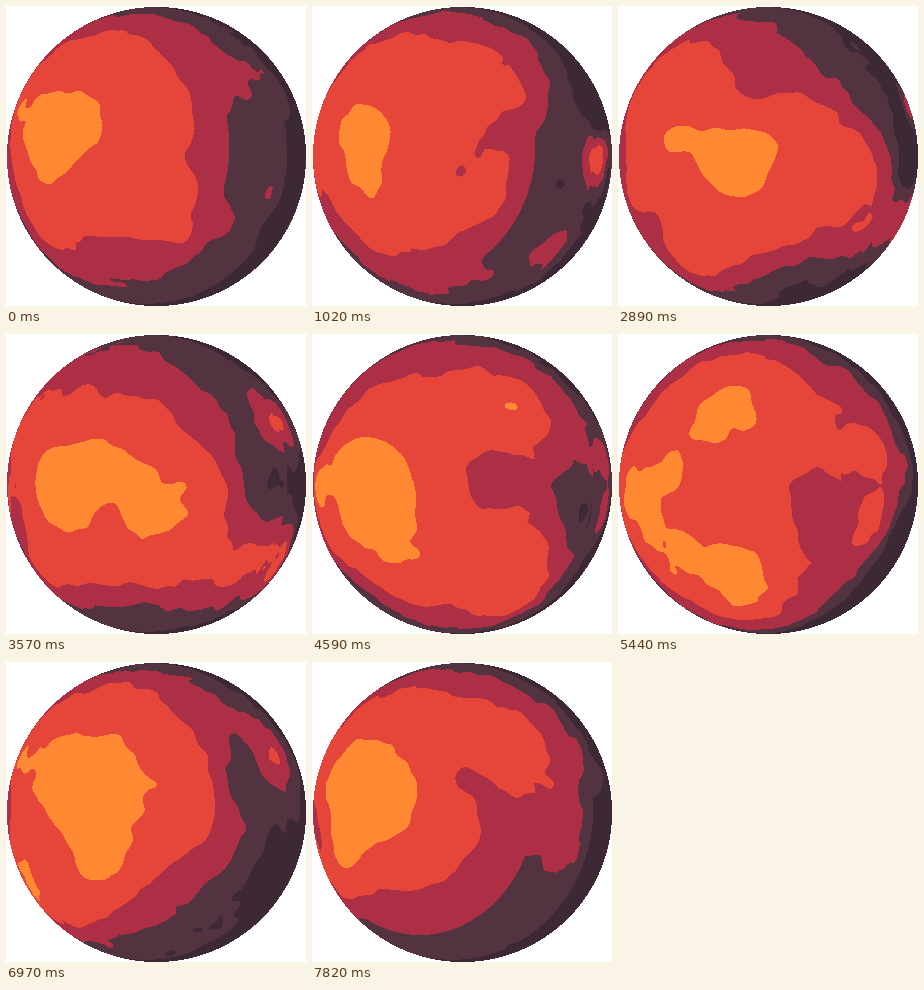
An HTML page with a canvas that plays this animation: 300x300 px, repeating every 7990 ms.

```html
<!DOCTYPE html>
<html lang="en">
<head>
<meta charset="utf-8">
<title>Rotating planet</title>
<style>
  html, body { margin: 0; width: 100%; height: 100%; overflow: hidden; background: #fff; }
  canvas { display: block; }
</style>
</head>
<body>
<canvas id="planet" width="300" height="300"></canvas>
<script>
const SIDE = 300;
const TURN = 60;          // steps in a full turn
const STEPS = 47;         // steps in the loop
const STEP_MS = 170;
const COLORS = ['ff8933', 'e64539', 'ad2f45', '52333f', '3d2936'];

// The globe is 400 units around; the visible side spans -100..100 both ways
const AROUND = 400, POLE = 100;
const LIGHT = { lon: -36, lat: -5 };
const MEAN = 0.44;
const REACH = 12;

// Key places (lon, lat) by terrain height; low ground is bright
const PLACES = [
  { height: 0.12, at: [[102, 0], [203, 50]] },
  { height: 0.21, at: [[140, -3], [137, 14], [174, 30], [195, -25], [203, 23], [206, -32],
    [249, -15], [251, 20], [325, -22]] },
  { height: 0.35, at: [[383, -14], [356, -24], [352, 14], [5, 19], [62, -24], [123, 9], [100, 19],
    [119, -15], [79, 37], [290, -10], [226, -19], [164, 0], [125, 27], [49, 13], [345, -4]] },
  { height: 0.48, at: [[12, -15], [20, 39], [70, -18], [222, 0], [235, 14], [266, 28],
    [156, -19], [328, 2], [174, -30], [305, 12], [368, 4]] },
  { height: 0.6, at: [[38, 5], [76, 0], [80, 17], [60, 25], [107, -20], [127, -34], [183, 0],
    [122, 55], [267, 52], [313, 20], [318, 32], [282, 31], [380, 33], [303, -13], [95, -28]] }
];

const clamp = v => Math.min(1, Math.max(0, v));
const ease = t => t * t * (3 - 2 * t);
const mix = (a, b, t) => a + (b - a) * t;
const wrap = (v, n) => ((v % n) + n) % n;

// Blend the four grid values around a point
function sample(value, x, y, curve) {
  const ix = Math.floor(x), iy = Math.floor(y);
  const fx = curve(x - ix), fy = curve(y - iy);
  return mix(
    mix(value(ix, iy), value(ix + 1, iy), fx),
    mix(value(ix, iy + 1), value(ix + 1, iy + 1), fx), fy);
}

// Seeded value noise in -0.5..0.5, seamless around the globe
function grain(lon, lat, cell) {
  const hash = (x, y) => wrap(Math.sin(wrap(x, AROUND / cell) * 12.99 + y * 78.23) * 437.58, 1);
  return sample(hash, lon / cell, lat / cell, ease) - 0.5;
}

// Influence of one place on another, fading with distance
function pull(a, lon, lat) {
  const across = wrap(a.lon - lon + AROUND / 2, AROUND) - AROUND / 2;
  const r = Math.hypot(across, a.lat - lat) / REACH;
  return (1 + r) * Math.exp(-r);
}

// Gaussian elimination with a unit-diagonal, symmetric positive matrix
function solve(rows) {
  const n = rows.length;
  for (let i = 0; i < n; i++) {
    for (let j = 0; j < n; j++) {
      if (j === i) continue;
      const k = rows[j][i] / rows[i][i];
      for (let c = i; c <= n; c++) rows[j][c] -= k * rows[i][c];
    }
  }
  return rows.map((row, i) => row[n] / row[i]);
}

// Smooth terrain through the key places, plus a little grain
function makeTerrain() {
  const nodes = PLACES.flatMap(({ height, at }) =>
    at.map(([lon, lat]) => ({ lon, lat, height })));
  const weights = solve(nodes.map(a =>
    [...nodes.map(b => pull(b, a.lon, a.lat)), a.height - MEAN]));
  const map = new Float32Array(AROUND * (2 * POLE + 2));
  for (let i = 0; i < map.length; i++) {
    const lon = i % AROUND, lat = Math.floor(i / AROUND) - POLE;
    let h = MEAN + 0.07 * grain(lon, lat, 10) + 0.04 * grain(lon, lat, 5);
    nodes.forEach((node, k) => { h += weights[k] * pull(node, lon, lat); });
    map[i] = Math.max(0.02, h);
  }
  return map;
}

// Distance from the light, with two bands of extra brightness
function shade(lon, lat) {
  const d = Math.hypot(lon - LIGHT.lon, lat - LIGHT.lat) / 200;
  let s = ease(clamp((d + 0.3) / 1.5));
  if (s < 0.362) s *= 0.9;
  if (s < 0.525) s *= 0.9;
  return s * 3.5;
}

function makePixels() {
  const pixels = [];
  for (let py = 0; py < SIDE; py++) {
    for (let px = 0; px < SIDE; px++) {
      const x = (px - 150) / 149.5, y = (py - 150) / 149.5;
      const r2 = x * x + y * y;
      if (r2 > 1) continue;
      const scale = 100 / (Math.sqrt(1 - r2) + 1);
      const lon = x * scale, lat = y * scale;
      pixels.push({ at: (py * SIDE + px) * 4, lon, lat, shade: shade(lon, lat) });
    }
  }
  return pixels;
}

const terrain = makeTerrain();
const pixels = makePixels();
const palette = COLORS.map(hex => [0, 2, 4].map(i => parseInt(hex.slice(i, i + 2), 16)));
const ctx = document.getElementById('planet').getContext('2d');
const image = ctx.createImageData(SIDE, SIDE);

const linear = t => t;
const heightAt = (x, y) => terrain[y * AROUND + x % AROUND];

function draw(step) {
  const shift = AROUND + step * AROUND / TURN;
  for (const p of pixels) {
    const h = sample(heightAt, p.lon + shift, p.lat + POLE, linear);
    const tone = (p.shade * Math.pow(h, 0.8) + 0.02) * 4.2;
    const rgb = palette[Math.min(4, Math.floor(tone))];
    image.data.set(rgb, p.at);
    image.data[p.at + 3] = 255;
  }
  ctx.putImageData(image, 0, 0);
}

let shown = 0;
draw(0);
const start = performance.now();

function tick() {
  const step = Math.floor((performance.now() - start) / STEP_MS) % STEPS;
  if (step !== shown) draw(shown = step);
  requestAnimationFrame(tick);
}
requestAnimationFrame(tick);
</script>
</body>
</html>
```
